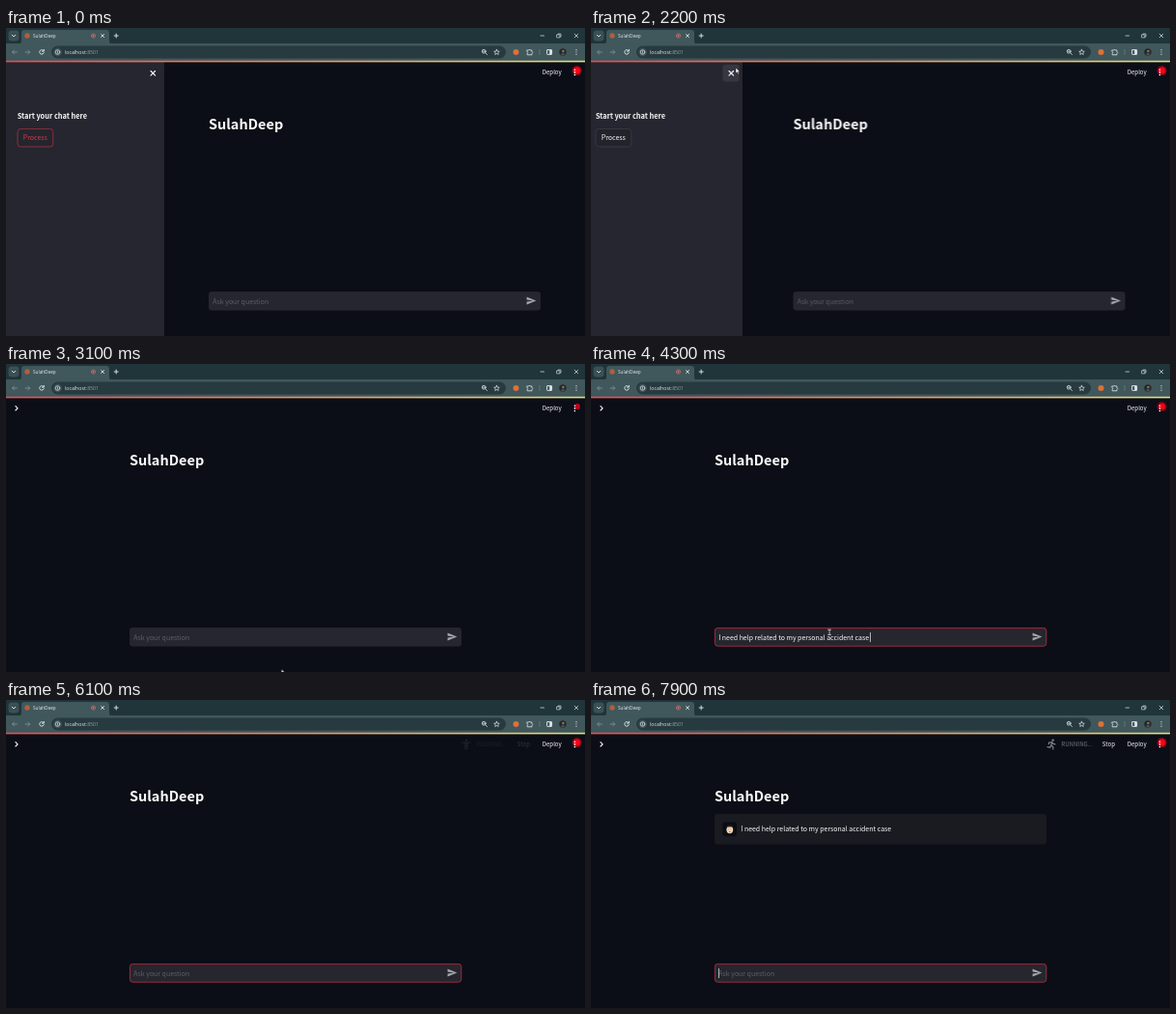
Recreate the animation shown at these times as an HTML page. Size 600 px wide and 319 px high, loop 8000 ms.

```html
<!DOCTYPE html>
<html lang="en">
<head>
<meta charset="utf-8">
<title>Chat demo</title>
<style>
html, body { margin: 0; width: 100%; height: 100%; overflow: hidden; background: #0b0e16; }
svg { display: block; width: 100vw; height: 100vh; }
text { font: 6.97px "Noto Sans CJK JP", "Noto Sans CJK SC", "Noto Sans CJK", "Noto Sans", sans-serif; fill: #fafafa; white-space: pre; }
.bar { font: 5.2px "Open Sans", "Noto Sans", sans-serif; fill: #e4eaeb; }
.title { font-size: 14.5px; font-weight: 700; }
.head { font-size: 7.42px; font-weight: 700; }
.small { font-size: 6.1px; }
.line { fill: none; stroke: #e4eaeb; stroke-width: .9; stroke-linecap: round; stroke-linejoin: round; }
.dim { stroke: #7d9094; }

/* Hard switches and moves share one 8 s loop. */
.cut { animation: 8s step-end infinite; }
.move { animation: 8s linear infinite; }
@keyframes idle { 0% { opacity: 1 } 26.25%, 100% { opacity: 0 } }
@keyframes calm { 0% { opacity: 0 } 26.25%, 100% { opacity: 1 } }
@keyframes hover { 0% { opacity: 0 } 20.5%, 100% { opacity: 1 } }
@keyframes reopen { 0% { opacity: 0 } 31%, 100% { opacity: 1 } }
@keyframes focus { 0% { opacity: 0 } 47%, 100% { opacity: 1 } }
@keyframes typed { 0% { opacity: 0 } 51.25% { opacity: 1 } 68.75%, 100% { opacity: 0 } }
@keyframes empty { 0% { opacity: 1 } 51.25% { opacity: 0 } 68.75%, 100% { opacity: 1 } }
@keyframes beam { 0% { opacity: 0 } 46.25% { opacity: 1 } 68.75%, 100% { opacity: 0 } }
@keyframes arrow { 0% { opacity: 0 } 12.5% { opacity: 1 } 46.25%, 100% { opacity: 0 } }
@keyframes reply { 0% { opacity: 0 } 85%, 100% { opacity: 1 } }
@keyframes slide {
  0%, 27% { transform: translateX(0) }
  27.5% { transform: translateX(-6px); animation-timing-function: ease-out }
  31%, 100% { transform: translateX(-164px) }
}
@keyframes shift {
  0%, 27.5% { transform: translateX(0); animation-timing-function: ease-out }
  31%, 100% { transform: translateX(-82px) }
}
@keyframes status {
  0%, 75% { opacity: 0 }
  76.25% { opacity: .17 }
  81%, 100% { opacity: 1 }
}
@keyframes pointer {
  0%, 12.5% { transform: translate(62px, 96px); animation-timing-function: ease-in-out }
  21%, 29% { transform: translate(150px, 41px); animation-timing-function: ease-in }
  34% { transform: translate(130px, 96px) }
  38.75% { transform: translate(285.5px, 316px) }
  41% { transform: translate(284px, 317px); animation-timing-function: ease-in-out }
  46.25%, 100% { transform: translate(247px, 277px) }
}
.caret { fill: #eee; animation: blink 1s step-end infinite; }
@keyframes blink { 0% { opacity: 1 } 50%, 100% { opacity: 0 } }
.pose path { fill: none; stroke: #85868d; stroke-width: 1.2; stroke-linecap: round; stroke-linejoin: round; }
.pose circle { fill: #85868d; }
.pose { animation: pose 1s step-end infinite; }
@keyframes pose { 0% { opacity: 1 } 25%, 100% { opacity: 0 } }
.glow { animation: glow 1s ease-in-out infinite alternate; }
@keyframes glow { 0% { opacity: 1 } 100% { opacity: 0 } }
</style>
</head>
<body>
<svg viewBox="0 0 600 319" preserveAspectRatio="none">
  <defs>
    <linearGradient id="rainbow">
      <stop offset="0" stop-color="#f5484b"/>
      <stop offset=".45" stop-color="#f28a58"/>
      <stop offset="1" stop-color="#e6df78"/>
    </linearGradient>
    <radialGradient id="red">
      <stop offset="0" stop-color="#ff0a1c"/>
      <stop offset=".55" stop-color="#ee0419"/>
      <stop offset="1" stop-color="#c00015" stop-opacity="0"/>
    </radialGradient>
  </defs>
  <rect width="600" height="319" fill="#0b0e16"/>

  <!-- Page content -->
  <g class="move" style="animation-name:shift">
    <text class="title" x="210" y="105.4">SulahDeep</text>
    <g class="cut" style="animation-name:reply">
      <rect x="210" y="118" width="344" height="31.5" rx="3" fill="#191b21"/>
      <rect x="218.5" y="126.5" width="14.5" height="14.5" rx="3" fill="#0b0d13"/>
      <ellipse cx="225.8" cy="134.2" rx="3.4" ry="4" fill="#f0d3b8"/>
      <path d="M222.2 133.4q-.4-4 3.6-4t3.6 4l-1.2-1.8h-4.8z" fill="#23201f"/>
      <path d="M224.3 133.8h.6m1.8 0h.6m-2.2 2.7h1.5" stroke="#5a3c30" stroke-width=".6"/>
      <text x="237.3" y="136.4">I need help related to my personal accident case</text>
    </g>
    <rect x="210" y="273" width="344" height="19.5" rx="3.2" fill="#25262e"/>
    <rect class="cut" style="animation-name:focus" x="210.4" y="273.4" width="343.4" height="18.8" rx="3" fill="none" stroke="#a92a3f" stroke-width=".9"/>
    <g class="cut" style="animation-name:empty">
      <text x="214.2" y="285.5" style="fill:#5d5e66">Ask your question</text>
      <g class="cut" style="animation-name:focus">
        <rect class="caret" style="animation-delay:-.5s" x="214.3" y="278" width=".7" height="10"/>
      </g>
    </g>
    <g class="cut" style="animation-name:typed">
      <text x="214.2" y="285.5">I need help related to my personal accident case</text>
      <rect class="caret" style="animation-delay:-.9s" x="371.3" y="278" width=".7" height="10"/>
    </g>
    <path d="M539.6 278.5l9.8 4-9.8 4v-3.1l6.6-.9-6.6-.9z" fill="#a4a5aa"/>
  </g>

  <g class="cut" style="animation-name:reopen">
    <path class="line" d="M9.9 43.6l2.2 2.2-2.2 2.2" style="stroke:#fafafa;stroke-width:1.1"/>
  </g>

  <!-- Run status -->
  <g class="move" style="animation-name:status">
    <g transform="translate(477 46)">
      <g class="pose">
        <circle cy="-4.2" r="1.2"/>
        <path d="M-4-2L-1.3-1.7H1.3L4-2M-1-1.5V4.8M1-1.5V4.8M-.9 1H.9"/>
      </g>
      <g class="pose" style="animation-delay:-.75s">
        <circle cy="-3.6" r="1.2"/>
        <path d="M-3-5L-1-1.6H1L3-5M0-1.5V1.2L-2.5 4.8M0 1.2L2.5 4.8"/>
      </g>
      <g class="pose" style="animation-delay:-.5s">
        <circle cx="1" cy="-4" r="1.2"/>
        <path d="M-3-.2L0-1.8L3 .2M0-1.6L-.5 1.2L2 2.4V4.8M-.5 1.2L-2.6 4.6"/>
      </g>
      <g class="pose" style="animation-delay:-.25s">
        <circle cx="1.7" cy="-4.4" r="1.2"/>
        <path d="M-2.7-.3L-2.3-2L.7-2.5L2-.6L4-.2M.6-2.2L-.2 1L1.8 2.4V5M-.2 1L-1.2 3.2L-4 2.7"/>
      </g>
    </g>
    <text class="small" x="487.3" y="48.1" style="fill:#75767d">RUNNING...</text>
    <text class="small" x="529.8" y="48.1">Stop</text>
  </g>
  <text class="small" x="555.8" y="48.1">Deploy</text>
  <circle cx="592" cy="43.9" r="2.9" fill="#c40218"/>
  <circle class="glow" cx="591.6" cy="44.1" r="5.8" fill="url(#red)"/>
  <path d="M589.4 43.2h0m0 2.7h0m0 2.7h0" stroke="#fff" stroke-width="1.6" stroke-linecap="round"/>

  <!-- Sidebar -->
  <g class="move" style="animation-name:slide">
    <rect y="35" width="164" height="284" fill="#25262f"/>
    <rect class="cut" style="animation-name:hover" x="143.3" y="38" width="17.5" height="17.5" rx="3" fill="#363740"/>
    <path class="line" d="M150 44.5l4.6 4.6m0-4.6l-4.6 4.6" style="stroke:#fafafa;stroke-width:1.1"/>
    <text class="head" x="11.7" y="94">Start your chat here</text>
    <g class="cut" style="animation-name:idle">
      <rect x="12" y="104.4" width="36.8" height="18.6" rx="3.2" fill="#25252e" stroke="#a8343f" stroke-width=".8"/>
      <text x="17.8" y="116.4" style="fill:#d03b49">Process</text>
    </g>
    <g class="cut" style="animation-name:calm">
      <rect x="12" y="104.4" width="36.8" height="18.6" rx="3.2" fill="#22232b" stroke="#42434b" stroke-width=".7"/>
      <text x="17.8" y="116.4">Process</text>
    </g>
  </g>

  <!-- Browser frame -->
  <rect width="600" height="16.5" fill="#203539"/>
  <rect y="16" width="600" height="18" fill="#40575c"/>
  <path d="M13 16.5q3 0 3-3V5q0-3 3-3h85q3 0 3 3v8.500q0 3 3 3z" fill="#40575c"/>
  <rect y="33.8" width="600" height="1.6" fill="url(#rainbow)"/>
  <rect x="2.6" y="2.6" width="10.800" height="10.800" rx="3" fill="#3a5055"/>
  <path class="line" d="M6.300 7.300l1.700 1.700 1.700-1.700"/>
  <circle cx="22" cy="8" r="2.700" fill="#a9623d"/>
  <text class="bar" x="28" y="9.800" style="font-size:4.700px">SulahDeep</text>
  <circle cx="90.500" cy="8" r="2.100" fill="none" stroke="#d8716b" stroke-width=".7"/>
  <circle cx="90.500" cy="8" r=".9" fill="#e4746c"/>
  <path class="line" d="M98.600 6.500l3 3m0-3l-3 3M112.200 8h4m-2-2v4"/>
  <path class="line" d="M554 8h3.500M589.200 6.200l3.600 3.600m0-3.600l-3.600 3.600" style="stroke-width:.7"/>
  <path class="line" d="M571 6.900h3v3h-3zM572 6.900V6h3v3h-1" style="stroke-width:.6"/>

  <path class="line dim" d="M11.300 25H6.600m2-2l-2 2 2 2M20 25h4.700m-2-2l2 2-2 2"/>
  <path class="line" d="M39 23.600a2.300 2.300 0 1 0 .3 2M39.300 22.300v1.800h-1.800"/>
  <rect x="47" y="18.500" width="471" height="13" rx="6.500" fill="#263a3f"/>
  <circle cx="53.500" cy="25" r="4.400" fill="#3a4f54"/>
  <circle class="line" cx="53.500" cy="25" r="2.300" style="stroke-width:.7"/>
  <path class="line" d="M53.500 24.800v1.200m0-2.200h0" style="stroke-width:.7"/>
  <text class="bar" x="61" y="26.900">localhost<tspan fill="#93a3a6">:8501</tspan></text>
  <circle class="line" cx="495.200" cy="24.200" r="1.900" style="stroke-width:.8"/>
  <path class="line" d="M496.700 25.700l1.800 1.800M494.400 24.200h1.600" style="stroke-width:.8"/>
  <path class="line" d="M508.500 22.300l.8 1.800 2 .2-1.500 1.300.4 1.900-1.700-1-1.700 1 .4-1.900-1.500-1.300 2-.2z" style="stroke-width:.7"/>
  <circle cx="528.500" cy="25" r="3" fill="#dc7136"/>
  <path class="line" d="M540.200 23h1.500q.8-2 1.600 0h1.700v1.600q1.600.8 0 1.600v1.600h-4.800v-1.600q1.600-.8 0-1.600z" style="stroke-width:.8"/>
  <path d="M553 22v6" stroke="#6f8589" stroke-width=".6"/>
  <rect class="line" x="560.600" y="22.600" width="5" height="4.800" rx=".6"/>
  <path d="M563.300 22.600h2.300v4.800h-2.300z" fill="#e4eaeb"/>
  <circle cx="577" cy="25" r="3.700" fill="#25282b"/>
  <circle cx="577.400" cy="23.900" r="1.200" fill="#8a7468"/>
  <path d="M574.800 27.800q2.400-4.400 4.800 0-2.400 1.600-4.800 0z" fill="#4a4d52"/>
  <path class="line" d="M591 22.700h0m0 2.300h0m0 2.300h0" style="stroke-width:1.200"/>

  <!-- Pointers -->
  <g class="cut" style="animation-name:arrow">
    <path class="move" style="animation-name:pointer" d="M0 0v6l1.400-1.200 1 2.200 1-.5-1-2.100h1.900z" fill="#fff" stroke="#111" stroke-width=".5"/>
  </g>
  <path class="cut line" style="animation-name:beam;stroke-width:.7" d="M245.600 275.200h3m-1.500 0v5.200m-1.500 0h3"/>
</svg>
</body>
</html>
```
